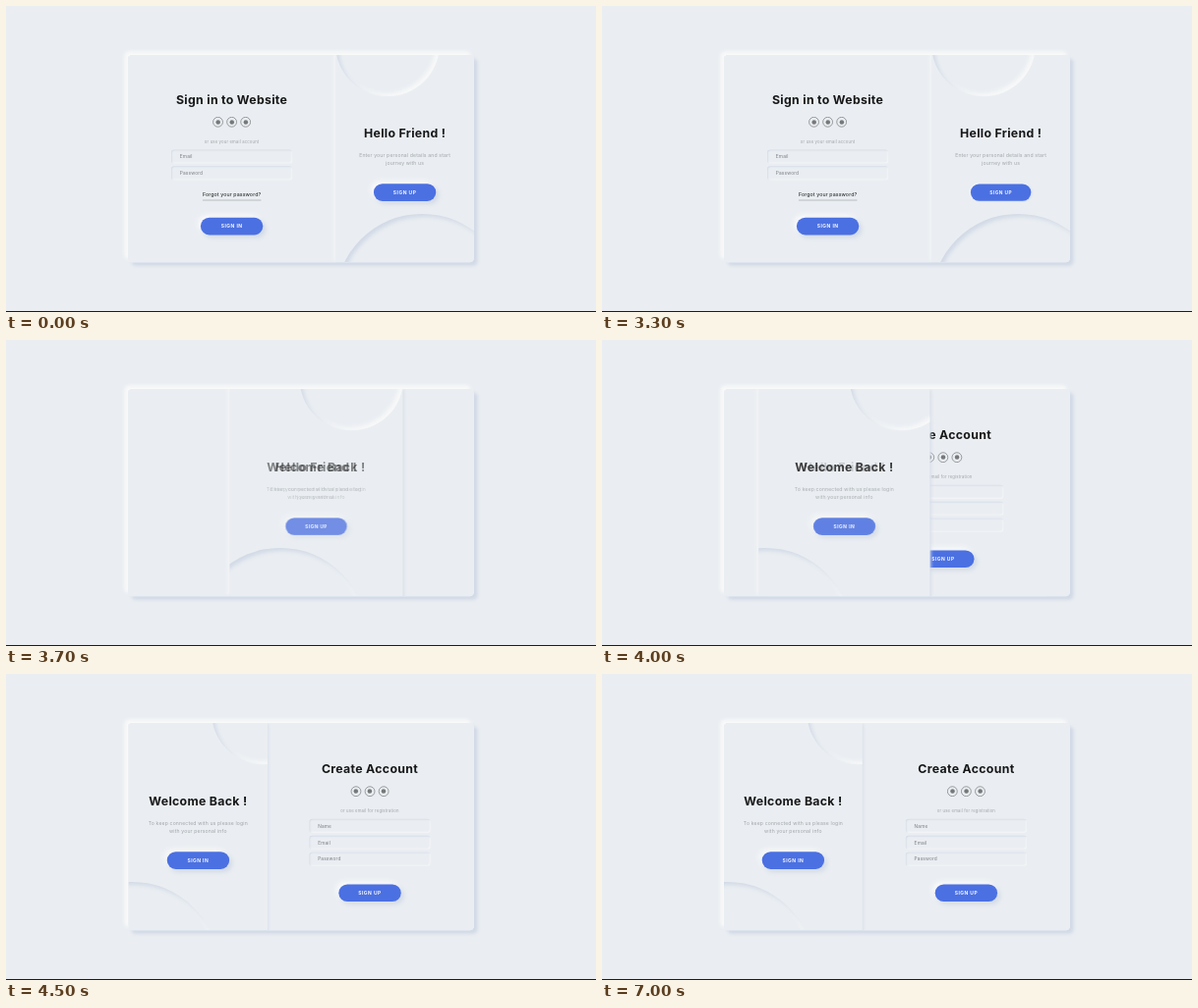
An HTML page that plays this animation: 600x312 px, repeating every 7.4 s.

```html
<!DOCTYPE html>
<html lang="en">
<head>
<meta charset="utf-8">
<title>Sign in</title>
<style>
  :root { --bg: #eaeef2; --dark: #d1d9e6; --light: #f9f9f9; }
  html, body { margin: 0; width: 100%; height: 100%; overflow: hidden; background: var(--bg); }
  #stage { position: relative; width: 600px; height: 312px; overflow: hidden; font-family: Inter, sans-serif; }
  #stage::after { content: ""; position: absolute; left: 0; right: 0; bottom: 0; height: 1px; background: #1c1c1e; }

  /* The card is laid out at 1000 x 600 and scaled down. */
  #card {
    position: absolute; left: 124px; top: 50px; width: 1000px; height: 600px;
    transform: scale(.352); transform-origin: 0 0; border-radius: 12px;
    box-shadow: 10px 10px 10px var(--dark), -10px -10px 10px var(--light);
  }
  #clip { position: absolute; inset: 0; overflow: hidden; border-radius: 12px; background: var(--bg); }
  .form, #panel { position: absolute; top: 0; left: 0; height: 600px; background: var(--bg); }
  .form { width: 600px; }
  #panel {
    width: 400px; overflow: hidden; z-index: 3;
    box-shadow: 4px 4px 10px var(--dark), -4px -4px 10px var(--light);
  }
  .side { position: absolute; left: 50%; top: 0; width: 400px; height: 600px; margin-left: -200px; }

  .at { position: absolute; left: 50%; top: calc(var(--y) * 1px); translate: -50% -50%; white-space: nowrap; text-align: center; }
  .title { font-size: 35px; font-weight: 700; letter-spacing: .85px; color: #181818; }
  .text { font-size: 14.5px; line-height: 22.5px; letter-spacing: .43px; color: #a0a5a8; }
  .note { font-size: 12px; letter-spacing: .43px; color: #a0a5a8; }
  .link { font-size: 15px; letter-spacing: .28px; color: #181818; }
  .link::after { content: ""; position: absolute; left: 0; right: 0; bottom: -7px; height: 1.6px; background: #a0a5a8; }
  .button {
    width: 180px; height: 50px; line-height: 50px; border-radius: 25px;
    background: #4b70e2; color: #f9f9f9; font-size: 14px; font-weight: 700; letter-spacing: 1.4px;
    box-shadow: 8px 8px 16px var(--dark), -8px -8px 16px var(--light);
  }
  .field {
    box-sizing: border-box; width: 350px; height: 40px; line-height: 40px; padding-left: 25px;
    text-align: left; font-size: 13.6px; letter-spacing: .43px; color: #7b7f83; border-radius: 8px;
    box-shadow: inset 2px 2px 4px var(--dark), inset -2px -2px 4px var(--light);
  }
  .field i { position: absolute; left: 24px; top: 11px; width: 2.5px; height: 18px; background: #333; visibility: hidden; }
  .icons { width: 110px; height: 30px; display: flex; gap: 10px; }
  .icons b { position: relative; box-sizing: border-box; width: 30px; height: 30px; border: 2.6px solid #181818; border-radius: 50%; opacity: .55; }
  .icons b::after { content: ""; position: absolute; inset: 6.5px; border-radius: 50%; background: #181818; }
  .circle {
    position: absolute; border-radius: 50%;
    box-shadow: inset 8px 8px 12px var(--dark), inset -8px -8px 12px var(--light);
  }
  #low { width: 500px; height: 500px; top: 460px; }
  #high { width: 300px; height: 300px; top: -180px; }
</style>
</head>
<body>
<div id="stage">
  <div id="card"><div id="clip">
    <div class="form" id="signUp">
      <div class="at title" style="--y:133">Create Account</div>
      <div class="at icons" style="--y:197.5"><b></b><b></b><b></b></div>
      <div class="at note" style="--y:254">or use email for registration</div>
      <div class="at field" style="--y:298">Name<i></i></div>
      <div class="at field" style="--y:346">Email<i></i></div>
      <div class="at field" style="--y:394">Password<i></i></div>
      <div class="at button" style="--y:492">SIGN UP</div>
    </div>
    <div class="form" id="signIn">
      <div class="at title" style="--y:128">Sign in to Website</div>
      <div class="at icons" style="--y:194"><b></b><b></b><b></b></div>
      <div class="at note" style="--y:250">or use your email account</div>
      <div class="at field" style="--y:294">Email<i></i></div>
      <div class="at field" style="--y:342">Password<i></i></div>
      <div class="at link" style="--y:405">Forgot your password?</div>
      <div class="at button" style="--y:496">SIGN IN</div>
    </div>
    <div id="panel">
      <div class="circle" id="low"></div>
      <div class="circle" id="high"></div>
      <div class="side" id="welcome">
        <div class="at title" style="--y:227">Welcome Back !</div>
        <div class="at text" style="--y:301">To keep connected with us please login<br>with your personal info</div>
        <div class="at button" style="--y:398">SIGN IN</div>
      </div>
      <div class="side" id="hello">
        <div class="at title" style="--y:227">Hello Friend !</div>
        <div class="at text" style="--y:301">Enter your personal details and start<br>journey with us</div>
        <div class="at button" id="press" style="--y:398">SIGN UP</div>
      </div>
    </div>
  </div></div>
</div>
<script>
const LOOP = 7400, STEP = 100;
const SLIDE = { start: 3318, length: 1280 };
const HOVERS = [[550, 800], [1000, 1320], [1380, 1650]];            // icon enter, leave
const CARETS = [[5600, 5900], [5900, 6500], [6500, 7000], [2100, 2500], [2500, 3000]];

const $ = id => document.getElementById(id);
const [signIn, signUp, panel, low, high, hello, welcome, press] =
  ['signIn', 'signUp', 'panel', 'low', 'high', 'hello', 'welcome', 'press'].map($);
const icons = signIn.querySelectorAll('.icons b');
const carets = document.querySelectorAll('.field i');

const mix = (a, b, k) => a + (b - a) * k;
const ramp = (t, a, b) => Math.min(1, Math.max(0, (t - a) / (b - a)));

// CSS "ease": cubic-bezier(.25, .1, .25, 1)
function ease(x) {
  if (x <= 0 || x >= 1) return x <= 0 ? 0 : 1;
  const curve = (a, b, s) => 3 * a * s * (1 - s) ** 2 + 3 * b * s * s * (1 - s) + s ** 3;
  let lo = 0, hi = 1;
  for (let i = 0; i < 24; i++) {
    const mid = (lo + hi) / 2;
    if (curve(.25, .25, mid) < x) lo = mid; else hi = mid;
  }
  return curve(.1, 1, lo);
}

function slide(t) {
  const p = ramp(t, SLIDE.start, SLIDE.start + SLIDE.length);
  const k = ease(p);
  const width = 400 + 100 * (ease(ramp(p, .1, .3)) - ease(ramp(p, .5, 1)));

  panel.style.left = mix(600, 0, k) + 'px';
  panel.style.width = width + 'px';
  low.style.left = mix(width - 400, -.6 * width, k) + 'px';
  high.style.left = mix(width - 400, .6 * width, k) + 'px';
  hello.style.opacity = 1 - k;
  welcome.style.opacity = k;
  for (const form of [signIn, signUp]) form.style.left = 400 * k + 'px';
  signIn.style.zIndex = 1;
  signUp.style.zIndex = k < .5 ? 0 : 2;
}

function pushButton(t) {
  const k = (ease(ramp(t, 2920, 3150)) + ease(ramp(t, 3150, 3300))) / 2;
  const d = mix(8, 2, k), blur = mix(16, 6, k);
  press.style.scale = mix(1, .97, k);
  press.style.boxShadow =
    `${d}px ${d}px ${blur}px var(--dark), ${-d}px ${-d}px ${blur}px var(--light)`;
}

function render(t) {
  HOVERS.forEach(([on, off], i) => {
    const k = ramp(t, on, on + 100) - ramp(t, off, off + 100);
    icons[i].style.opacity = mix(.55, 1, k);
  });
  CARETS.forEach(([on, off], i) => {
    carets[i].style.visibility = t >= on && t < off ? 'visible' : 'hidden';
  });
  pushButton(t);
  slide(t);
}

const start = performance.now();
function tick() {
  const t = (performance.now() - start) % LOOP;
  render(Math.floor(t / STEP) * STEP);
  requestAnimationFrame(tick);
}
tick();
</script>
</body>
</html>
```
